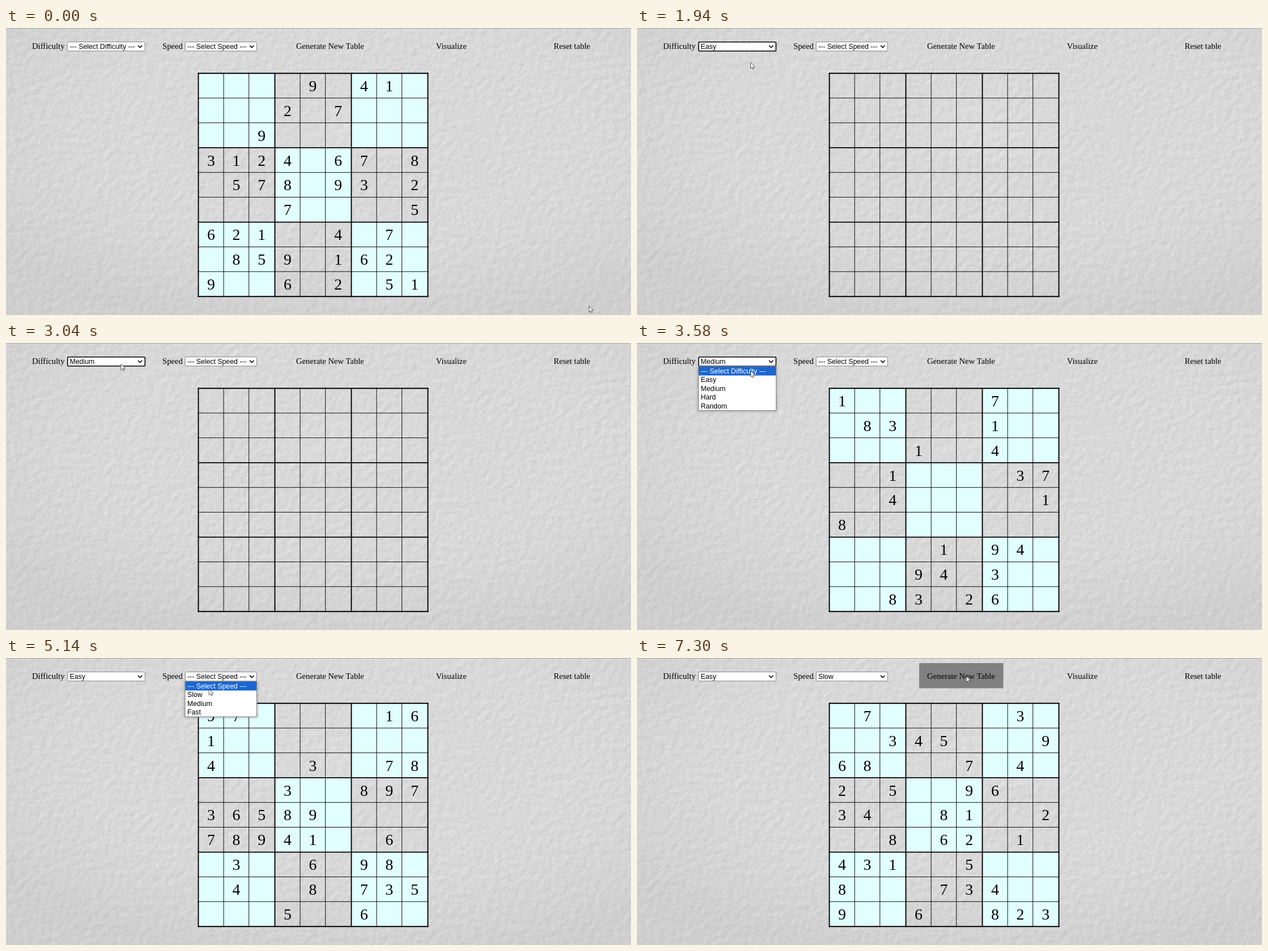
An HTML page for the animation above (8000 ms loop, 1103x508 px).

```html
<!DOCTYPE html>
<html lang="en">
<head>
<meta charset="utf-8">
<title>Sudoku visualizer</title>
<style>
  html, body { margin: 0; width: 100%; height: 100%; overflow: hidden; background: #d8d8d8; }
  svg { position: absolute; left: 0; top: 0; width: 1103px; height: 508px; }
  #ui { will-change: transform; }
  .serif { font-family: "Liberation Serif", "Times New Roman", serif; font-size: 14.65px; }
  .sans { font-family: "Liberation Sans", Arial, sans-serif; font-size: 12.3px; }
  .digit { font-size: 27.7px; text-anchor: middle; }
</style>
</head>
<body>
<svg id="wall" viewBox="0 0 1103 508">
  <defs>
    <filter id="plaster" x="0" y="0" width="100%" height="100%" color-interpolation-filters="sRGB">
      <feTurbulence type="fractalNoise" baseFrequency=".09" numOctaves="3" seed="8"/>
      <feDiffuseLighting surfaceScale=".32" diffuseConstant="1.22" lighting-color="#d9d9d9">
        <feDistantLight azimuth="225" elevation="55"/>
      </feDiffuseLighting>
    </filter>
    <radialGradient id="shade" cx=".55" cy=".35" r=".7">
      <stop offset="0" stop-color="#fff" stop-opacity=".08"/>
      <stop offset=".5" stop-color="#aaa" stop-opacity="0"/>
      <stop offset="1" stop-color="#888" stop-opacity=".12"/>
    </radialGradient>
  </defs>
  <rect width="1103" height="508" filter="url(#plaster)"/>
  <rect width="1103" height="508" fill="url(#shade)"/>
  <g id="dents" fill="none" stroke-linecap="round" opacity=".4"/>
  <rect width="1103" height="1" fill="#a9a9a9"/>
</svg>
<svg id="ui" viewBox="0 0 1103 508">
  <defs>
    <filter id="shadow" x="-10%" y="-10%" width="120%" height="130%"><feGaussianBlur stdDeviation="2"/></filter>
    <radialGradient id="glowFill">
      <stop offset=".6" stop-color="#f7e733" stop-opacity=".75"/>
      <stop offset="1" stop-color="#f7e733" stop-opacity="0"/>
    </radialGradient>
  </defs>
  <rect id="hover" x="498" y="9" width="148.5" height="44.5" fill="#808080"/>
  <g id="labels" class="serif"/>
  <g id="blocks" fill="#e2ffff"/>
  <g id="lines" stroke="#000"/>
  <g id="digits" class="serif"/>
  <g id="selects" class="sans"/>
  <g id="menus" class="sans"/>
  <circle id="glow" r="8.5" fill="url(#glowFill)"/>
  <path id="cursor" d="M0 0V10.6L2.5 8.4 4.1 12 5.9 11.2 4.3 7.7H7.4Z" fill="#fff" stroke="#333" stroke-width=".8"/>
</svg>
<script>
const LOOP = 8000, ROW = 15.5, MENU_TOP = 41, LOADING = 170;
const $ = id => document.getElementById(id);

function add(parent, tag, attrs, text) {
  const el = document.createElementNS("http://www.w3.org/2000/svg", tag);
  for (const k in attrs) el.setAttribute(k, attrs[k]);
  if (text !== undefined) el.textContent = text;
  return parent.appendChild(el);
}
const show = (el, on) => el.setAttribute("visibility", on ? "visible" : "hidden");
const setText = (el, s) => { if (el.textContent !== s) el.textContent = s; };
const within = (t, [a, b]) => t >= a && t < b;
const latest = (list, t) => list.filter(e => e[0] <= t).pop()[1];

let seed = 11;
const rand = () => (seed = seed * 16807 % 2147483647) / 2147483647;

// Small scratches in the plaster
for (let i = 0; i < 46; i++) {
  const x = 785 + rand() * 108, y = 238 + rand() * 58, dx = 3 + rand() * 5, dy = rand() * 12 - 4;
  const d = `M${x} ${y}q${dx} ${dy / 3} ${dx} ${dy}`;
  add($("dents"), "path", { d, stroke: "#b4b4b4" });
  add($("dents"), "path", { d, stroke: "#f2f2f2", transform: "translate(1.2 1.2)" });
}

// Header
const labels = { "Difficulty": 46, "Speed": 276, "Generate New Table": 512, "Visualize": 758.7, "Reset table": 966.4 };
for (const s in labels) add($("labels"), "text", { x: labels[s], y: 36.8 }, s);

// Board: three blocks of three cells each way
const colX = i => 339.5 + 135 * Math.floor(i / 3) + 44.6 * (i % 3);
const rowY = i => 80.2 + 131.7 * Math.floor(i / 3) + 43.8 * (i % 3);
const cells = [];
for (let r = 0; r < 9; r++)
  for (let c = 0; c < 9; c++) {
    if (r % 3 === 0 && c % 3 === 0 && (r + c) % 2 === 0)
      add($("blocks"), "rect", { x: colX(c), y: rowY(r), width: 135, height: 131.7 });
    cells.push(add($("digits"), "text", { class: "digit", x: colX(c) + 22.4, y: rowY(r) + 31.7 }, ""));
  }
for (let i = 0; i < 10; i++) {
  const w = i % 3 ? .95 : 1.9;
  add($("lines"), "path", { d: `M${colX(i)} ${rowY(0) - .9}V${rowY(9) + .9}`, "stroke-width": w });
  add($("lines"), "path", { d: `M${colX(0) - .9} ${rowY(i)}H${colX(9) + .9}`, "stroke-width": w });
}

// A shifted-row grid with most cells left out
function sparseBoard() {
  let s = "";
  for (let i = 0; i < 81; i++) {
    const r = Math.floor(i / 9);
    s += rand() < .33 ? 1 + (r % 3 * 3 + Math.floor(r / 3) + i * 4) % 9 : ".";
  }
  return s;
}
const puzzles = {
  first: "....9.41. ...2.7... ..9...... 3124.67.8 .578.93.2 ...7....5 621..4.7. .859.162. 9..6.2.51",
  easy: "......26. 1..345..9 ..9..63.5 2.345.69. .4..6.1.. ..87..... .5.68.... 8629..513 9...31.26",
  medium: sparseBoard(),
  easyAgain: "97.....16 1........ 4...3..78 ...3..897 36589.... 78941..6. .3..6.98. .4..8.735 ...5..6..",
  generated: ".7.....3. ..345...9 68...7.4. 2.5..96.. 34..81..2 ..8.62.1. 431..5... 8...734.. 9..6..823"
};

// Dropdowns
function makeSelect(x, w, options) {
  const h = options.length * ROW, s = { x, options, opens: [], values: [[0, 0]] };
  s.box = add($("selects"), "rect", { x: x + .2, y: 24.7, width: w - .4, height: 16.1, rx: 2, fill: "#fff" });
  s.label = add($("selects"), "text", { x: x + 4, y: 36.9 }, "");
  add($("selects"), "path", { d: `M${x + w - 12.5} 30.8l3.7 3.7 3.7-3.7`, fill: "none", stroke: "#111", "stroke-width": 1.7 });

  s.frame = add($("menus"), "g", {});
  add(s.frame, "path", {
    d: `M${x} ${MENU_TOP}v${h + 1}h${w}v${-h - 1}`, fill: "none", stroke: "#666",
    "stroke-width": 3, opacity: .5, filter: "url(#shadow)"
  });
  add(s.frame, "rect", { x, y: MENU_TOP, width: w, height: h + 1, fill: "#d8d8d8", "fill-opacity": .8, stroke: "#aaa", "stroke-width": .8 });
  s.list = add($("menus"), "g", {});
  add(s.list, "rect", { x, y: MENU_TOP + .5, width: w, height: h + .5, fill: "#fff", stroke: "#767676", "stroke-width": .9 });
  s.bar = add(s.list, "rect", { x: x + .5, width: w - 1, height: ROW, fill: "#1967d2" });
  s.rows = options.map((o, i) => add(s.list, "text", { x: x + 4, y: MENU_TOP + 12.5 + i * ROW }, o));
  return s;
}
const difficulty = makeSelect(108.5, 137, ["--- Select Difficulty ---", "Easy", "Medium", "Hard", "Random"]);
const speed = makeSelect(316, 126.5, ["--- Select Speed ---", "Slow", "Medium", "Fast"]);

// The session, written as actions on a shared timeline
const moves = [], clicks = [], focus = [[0, null]], boards = [[0, puzzles.first]];
let pos = { x: 1029, y: 492 };

function move(from, to, x, y) {
  moves.push({ from, to, a: pos, b: { x, y } });
  pos = { x, y };
}
function choose(select, option, press, close) {
  if (latest(focus, press) !== select) focus.push([press, null]);
  clicks.push([press - 140, press + LOADING], [close - 90, close]);
  select.opens.push([press, close]);
  move(press + LOADING, close - 160, pos.x - 5, MENU_TOP + (option + .5) * ROW);
  select.values.push([close, option]);
  focus.push([close, select]);
}
function rebuild(clear, fill, puzzle) {
  boards.push([clear, ""], [fill, puzzle]);
}

move(70, 910, 204, 39);
choose(difficulty, 1, 1300, 1860);
rebuild(1860, 2260, puzzles.easy);
move(1860, 2260, 213.5, 33);
choose(difficulty, 2, 2420, 2870);
rebuild(2870, 3270, puzzles.medium);
move(2870, 3040, 203, 37);
choose(difficulty, 1, 3340, 3820);
rebuild(3820, 4530, puzzles.easyAgain);
move(3820, 4380, 362, 28);
choose(speed, 1, 4690, 5440);
move(5440, 6060, 608, 48);
move(6290, 6640, 581, 32);
clicks.push([6740, 6900]);
focus.push([6740, null]);
rebuild(6900, 7300, puzzles.generated);

function pointer(t) {
  const m = moves.filter(m => m.from <= t).pop() || moves[0];
  const u = Math.min(1, Math.max(0, (t - m.from) / (m.to - m.from))), e = u * u * (3 - 2 * u);
  return { x: m.a.x + (m.b.x - m.a.x) * e, y: m.a.y + (m.b.y - m.a.y) * e };
}

function drawSelect(s, t, y) {
  const value = latest(s.values, t), focused = latest(focus, t) === s;
  setText(s.label, s.options[value]);
  s.box.setAttribute("stroke", focused ? "#000" : "#767676");
  s.box.setAttribute("stroke-width", focused ? 1.6 : .9);
  const open = s.opens.find(o => within(t, o));
  const filled = !!open && t >= open[0] + LOADING;
  show(s.frame, open);
  show(s.list, filled);
  const over = Math.floor((y - MENU_TOP - 1) / ROW);
  const active = over < 0 ? value : Math.min(over, s.rows.length - 1);
  s.bar.setAttribute("y", MENU_TOP + 1 + active * ROW);
  s.rows.forEach((r, i) => r.setAttribute("fill", i === active ? "#fff" : "#000"));
}

function draw(t) {
  const { x, y } = pointer(t);
  $("cursor").setAttribute("transform", `translate(${x} ${y})`);
  $("glow").setAttribute("cx", x);
  $("glow").setAttribute("cy", y + 1);
  show($("glow"), clicks.some(c => within(t, c)));
  show($("hover"), x > 498 && x < 646 && y < 47);

  const digits = latest(boards, t).replace(/ /g, "");
  show($("blocks"), digits);
  cells.forEach((cell, i) => setText(cell, (digits[i] || "").replace(".", "")));
  for (const s of [difficulty, speed]) drawSelect(s, t, y);
}

const start = performance.now();
function tick() {
  draw((performance.now() - start) % LOOP);
  requestAnimationFrame(tick);
}
tick();
</script>
</body>
</html>
```
